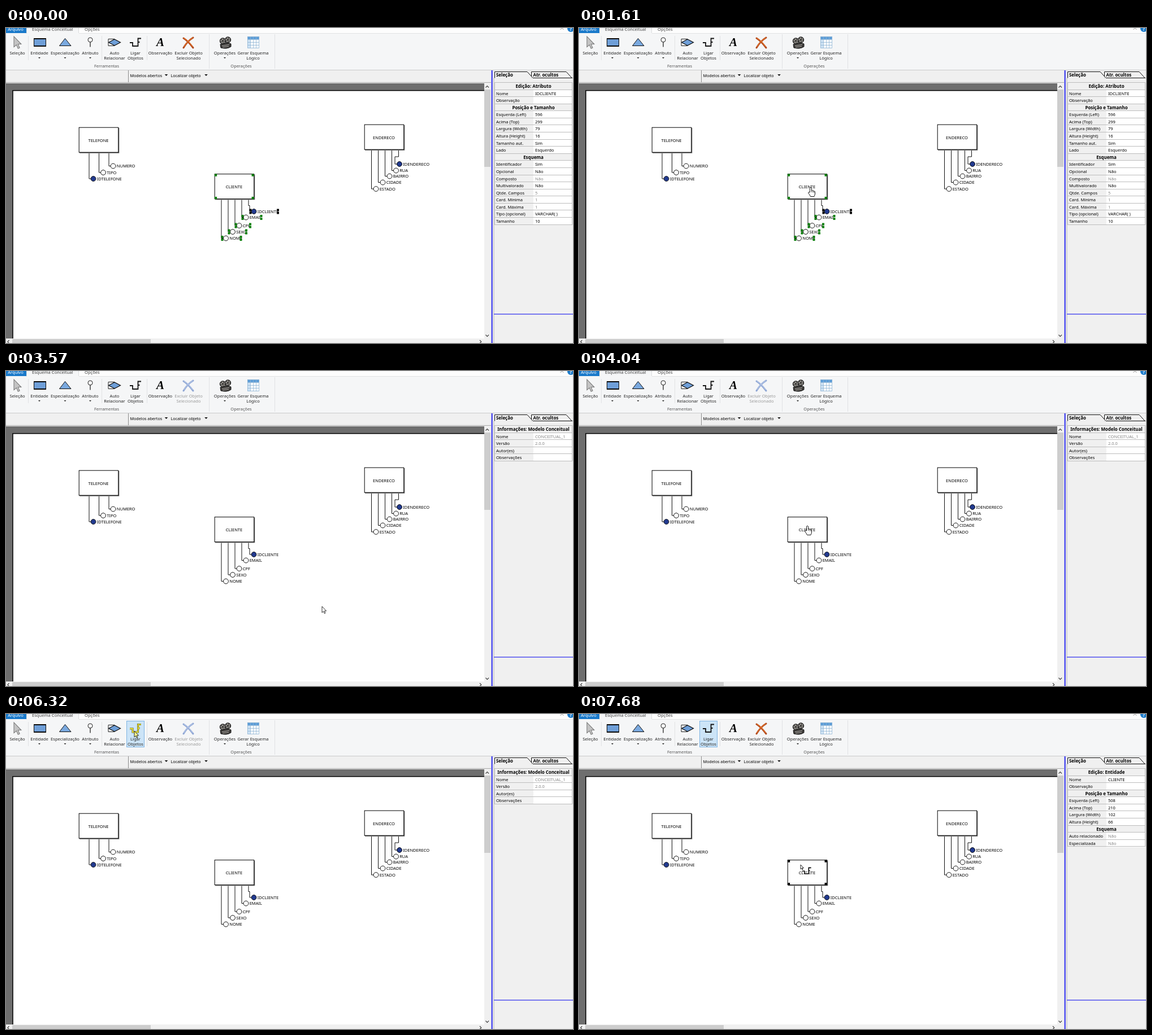
Recreate the animation shown at these times as an HTML page with a canvas. Size 1003x558 px, loop 8000 ms.

```html
<!DOCTYPE html>
<html lang="pt">
<head>
<meta charset="utf-8">
<title>Esquema Conceitual</title>
<style>
html, body { margin: 0; width: 100%; height: 100%; overflow: hidden; background: #f0f0f0; }
canvas { display: block; }
</style>
</head>
<body>
<canvas id="stage" width="1003" height="558"></canvas>
<script>
const LOOP = 8000;
const g = document.getElementById('stage').getContext('2d');
const SANS = '"Noto Sans", "Open Sans", sans-serif';
const FORM = '7.5px ' + SANS, BOLD = 'bold 7.9px ' + SANS, RIBBON = '7.6px ' + SANS;

function rect(x, y, w, h, color) {
  g.fillStyle = color;
  g.fillRect(x, y, w, h);
}
function text(s, x, y, font = FORM, color = '#000', align = 'left') {
  g.font = font;
  g.fillStyle = color;
  g.textAlign = align;
  g.fillText(s, x, y + 2.7);
}
function shape(d, fill, stroke, width = 1) {
  const p = new Path2D(d);
  if (fill) { g.fillStyle = fill; g.fill(p); }
  if (stroke) { g.strokeStyle = stroke; g.lineWidth = width; g.stroke(p); }
}
function disc(x, y, r, fill, stroke, width = 1) {
  g.beginPath();
  g.arc(x, y, r, 0, 7);
  if (fill) { g.fillStyle = fill; g.fill(); }
  if (stroke) { g.strokeStyle = stroke; g.lineWidth = width; g.stroke(); }
}
function at(x, y, scale, draw) {
  g.save();
  g.translate(x, y);
  g.scale(scale, scale);
  draw();
  g.restore();
}
const caret = (x, y, r = 2) => shape(`M${x - r} ${y - r / 2}h${2 * r}l${-r} ${r}Z`, '#111');

// ---- ribbon ----
const ARROW = 'M0 0V11L2.6 8.7L4.3 12.6L6 11.8L4.3 8H7.6Z';
const HAND = 'M-1.5 9V1.2Q0 -.6 1.5 1.2V6Q3 5 4 6.5Q5.6 5.8 6 7.3Q7.6 6.8 7.5 8.5V12' +
  'Q7 14 6 16.5H-.5Q-2 13 -4.2 10.5Q-4.5 8.5 -3 8.8Z';
const LINK = 'M0 8H5V14H14.5V0.5H20M14.5 7H17.5';

const BUTTONS = [
  [20, 'Seleção'], [59, 'Entidade', '', 1], [104.5, 'Especialização', '', 1],
  [149, 'Atributo', '', 1], [192, 'Auto', 'Relacionar'], [229, 'Ligar', 'Objetos'],
  [273, 'Observação'], [323, 'Excluir Objeto', 'Selecionado'],
  [387, 'Operações', '', 1], [437, 'Gerar Esquema', 'Lógico']
];

function reel(x, y, r) {
  disc(x, y, r, '#4a4845', '#1c1c1c');
  for (let i = 0; i < 5; i++) {
    const a = i * Math.PI * 0.4 - 0.5;
    disc(x + Math.cos(a) * r * 0.58, y + Math.sin(a) * r * 0.58, r * 0.2, '#c9c7c3');
  }
}

function icons(s) {
  at(14, 15, 1.7, () => shape(ARROW, '#c4c4c4', '#777', 0.6));

  rect(49, 18, 22, 15, '#0a0a0a');
  rect(50, 20, 20, 11, '#6f9fd8');
  shape('M104.5 18.5L94.5 31.5H115Z', '#7aa9df', '#111');
  disc(149, 21, 4, '#fff', '#222');
  shape('M149 25V33.5', null, '#222', 1.3);
  shape('M181 19.5H192M181 19.5V25.5M181 31.5H192M181 31.5V25.5', null, '#222');
  shape('M181.5 25.5L192 20L202.5 25.5L192 31Z', '#6f9fd8', '#111', 1.2);

  at(219, 18, 1, () => {
    shape(LINK, null, s.click ? '#4d4a18' : '#151515', s.click ? 3 : 1.8);
    if (s.click) shape(LINK, null, '#e8dc2c', 1.8);
  });

  g.font = 'italic bold 21px "Liberation Serif", "Noto Serif", serif';
  g.fillStyle = '#000';
  g.textAlign = 'center';
  g.fillText('A', 273, 32);

  const off = s.none;
  g.lineCap = 'round';
  shape('M314 18Q322 23 331 35M331 17Q321 23 314 35', null, off ? '#8ea6d4' : '#b0481c', 3);
  shape('M315 18Q323 23 330 33M330 17.5Q321 23 315 33', null, off ? '#b4c5e6' : '#e2742c', 1.3);
  g.lineCap = 'butt';

  shape('M379 29Q388 24 398 28V33Q391 38 380 35Z', '#3a3836', '#1c1c1c');
  reel(383.5, 23, 5.2);
  reel(392.5, 21, 5.2);
  shape('M382 31.5L395 29.5M383 34L394 32.5', null, '#b5b2ae', 1.2);

  rect(427, 15, 21, 21, '#fff');
  rect(427, 15, 21, 5, '#5e9ed8');
  rect(427, 20, 5, 16, '#cfe3f5');
  let grid = 'M427.5 15.5H447.5V35.5H427.5Z';
  for (let i = 1; i < 4; i++) grid += `M${427.5 + i * 5} 15.5v20M427.5 ${15.5 + i * 5}h20`;
  shape(grid, null, '#8fb4d4', 0.8);
}

function ribbon(s) {
  rect(0, 0, 1003, 9, '#fdfdfd');
  rect(0, 9, 1003, 65, '#f5f6f7');
  rect(36, 9, 967, 1, '#e2e3e4');
  rect(37, 0, 92, 11, '#f5f6f7');
  rect(36, 0, 1, 9, '#dcdddf');
  rect(128, 0, 1, 9, '#dcdddf');
  rect(0, 0, 36, 9, '#1979ca');
  text('Arquivo', 17, 2, RIBBON, '#fff', 'center');
  text('Esquema Conceitual', 46, 2, RIBBON, '#444');
  text('Opções', 139, 2, RIBBON, '#444');
  shape('M980.5 3L983.5 0L986.5 3', null, '#999', 1);
  disc(999, 1, 6, '#1d7ccb');
  text('?', 999, 2, 'bold 8px ' + SANS, '#fff', 'center');

  for (const x of [39, 169, 249]) rect(x, 14, 1, 43, '#e1e2e4');
  for (const x of [359, 475]) rect(x, 11, 1, 61, '#e1e2e4');
  if (s.hot) {
    rect(213, 12, 32, 47, '#7fb4e3');
    rect(214, 13, 30, 45, '#cce4f7');
  }
  for (const [x, a, b, menu] of BUTTONS) {
    const color = s.none && a.startsWith('Excluir') ? '#9a9a9a' : '#262626';
    text(a, x, 44, RIBBON, color, 'center');
    if (b) text(b, x, 53, RIBBON, color, 'center');
    if (menu) caret(x, 53);
  }
  text('Ferramentas', 178, 67, '7.4px ' + SANS, '#555', 'center');
  text('Operações', 416, 67, '7.4px ' + SANS, '#555', 'center');
  icons(s);
  rect(0, 74, 1003, 1, '#c9cacb');
}

// ---- work area ----
function frame() {
  rect(0, 75, 1003, 483, '#f0f0f0');
  rect(0, 96, 858, 1, '#a8a8a8');
  rect(216, 75, 1, 21, '#8c8c8c');
  text('Modelos abertos', 219.5, 84, '7.2px ' + SANS);
  caret(283.5, 83.5, 2.8);
  text('Localizar objeto', 291.5, 84, '7.2px ' + SANS);
  caret(354, 83.5, 2.8);

  rect(0, 98, 846, 452, '#6e6e6e');
  rect(11.3, 110, 834.7, 440, '#000');
  rect(12.8, 111.5, 833.2, 438.5, '#fff');
  rect(846, 109, 11, 137, '#cdcdcd');
  rect(11, 551, 245, 7, '#cdcdcd');
  shape('M848.5 105.5L851.3 102.7L854 105.5M848.5 543.5L851.3 546.3L854 543.5' +
    'M5.5 553L2.8 555.8L5.5 558.5M838 553L840.8 555.8L838 558.5', null, '#444', 1.2);
  rect(858.6, 75, 2.1, 483, '#3333ee');
}

// x, y, title, then attributes: line x, dot x, dot y, name
const ENTITIES = [
  [129, 176, 'TELEFONE', [[147, 154.5, 267, 'IDTELEFONE', 1], [164.5, 172, 256, 'TIPO'],
    [182, 189.5, 244.5, 'NUMERO']]],
  [634, 171, 'ENDERECO', [[646.5, 654.5, 285, 'ESTADO'], [658.5, 666.5, 273.5, 'CIDADE'],
    [670.5, 678.5, 262.5, 'BAIRRO'], [682.5, 690, 252.5, 'RUA'],
    [694.5, 696, 241, 'IDENDERECO', 1, 688]]],
  [369, 258.5, 'CLIENTE', [[381, 389, 372.5, 'NOME'], [393, 401, 361, 'SEXO'],
    [405, 412.5, 350, 'CPF'], [417, 424.5, 335.5, 'EMAIL'],
    [429, 438.5, 325, 'IDCLIENTE', 1, 431]]]
];
const RIGHT_EDGE = { NOME: 413.5, SEXO: 423, CPF: 430, EMAIL: 449.5, IDCLIENTE: 479 };

function entity([x, y, title, attrs]) {
  rect(x + 1, y + 1, 70.3, 44.8, '#666');
  rect(x - 0.3, y - 0.3, 70.5, 45, '#000');
  rect(x + 0.7, y + 0.7, 68.5, 43, '#fff');
  text(title, x + 34.5, y + 23, FORM, '#000', 'center');
  for (const [lx, cx, cy, name, key, bend] of attrs) {
    const down = bend ? `V${y + (bend < lx ? 57 : 56)}H${bend}` : '';
    shape(`M${lx} ${y + 46}${down}V${cy}H${cx - 4}`, null, '#111');
    disc(cx, cy, 4.4, key ? '#223a90' : '#fff', '#111');
    text(name, cx + 6.2, cy, FORM);
  }
}

function corners(color) {
  for (const x of [369, 434.5])
    for (const y of [258.5, 299]) rect(x, y, 4.2, 4.2, color);
}
function groupHandles() {
  corners('#0a800a');
  for (const [lx, , cy, name, , bend] of ENTITIES[2][3]) {
    const color = bend ? '#000' : '#0a800a';
    for (const x of [(bend || lx) - 0.5, RIGHT_EDGE[name]]) {
      rect(x, cy - 4.5, 4, 4, color);
      rect(x, cy + 0.5, 4, 4, color);
    }
  }
}

// ---- property panel: '#' starts a heading, '~' a greyed value ----
const PANELS = {
  group: ['#Edição: Atributo', 'Nome|IDCLIENTE', 'Observação|', '#Posição e Tamanho',
    'Esquerda (Left)|596', 'Acima (Top)|299', 'Largura (Width)|79', 'Altura (Height)|16',
    'Tamanho aut.|Sim', 'Lado|Esquerdo', '#Esquema', 'Identificador|Sim', 'Opcional|Não',
    'Composto|~Não', 'Multivalorado|Não', 'Qtde. Campos|~5', 'Card. Mínima|~1',
    'Card. Máxima|~1', 'Tipo (opcional)|VARCHAR( )', 'Tamanho|10'],
  none: ['#Informações: Modelo Conceitual', 'Nome|~CONCEITUAL_1', 'Versão|~2.0.0',
    'Autor(es)|', 'Observações|'],
  one: ['#Edição: Entidade', 'Nome|CLIENTE', 'Observação|', '#Posição e Tamanho',
    'Esquerda (Left)|508', 'Acima (Top)|210', 'Largura (Width)|102', 'Altura (Height)|66',
    '#Esquema', 'Auto relacionado|~Não', 'Especializada|~Não']
};

function panel(rows) {
  rect(862.5, 88, 1, 470, '#b5b5b5');
  shape('M929.5 88.5V77.5H991L1001 88.5', '#f0f0f0', '#111');
  shape('M864.5 88.5V77.5H922L932 88.5', '#f0f0f0', '#111');
  shape('M932 88.5H1002', null, '#111');
  text('Seleção', 867, 83, BOLD);
  text('Atr. ocultos', 932.5, 83, BOLD);
  const step = 12.58;
  rows.forEach((row, i) => {
    const y = 97 + i * step, mid = y + 6.3;
    if (row[0] === '#') {
      text(row.slice(1), 933, mid, BOLD, '#000', 'center');
    } else {
      const [name, value] = row.split('|');
      const grey = value[0] === '~';
      rect(933, Math.round(y), 69, 13, '#fff');
      text(name, 867, mid);
      text(grey ? value.slice(1) : value, 936, mid, FORM, grey ? '#858585' : '#000');
    }
    rect(864, Math.round(y) - 1, 138, 1, '#bdbdbd');
  });
  const end = Math.round(97 + rows.length * step);
  rect(864, end - 1, 138, 1, '#bdbdbd');
  rect(864, 96, 1, end - 96, '#bdbdbd');
  rect(1001, 96, 1, end - 96, '#bdbdbd');
  rect(863, 506, 140, 1.6, '#5a5aee');
}

// ---- pointer: start, end, steps, bend x/y, target x/y ----
const MOVES = [
  [440, 1200, 12, 600, 30, 422, 284],
  [1280, 1600, 6, 450, 288, 410, 282],
  [1670, 1960, 5, 414, 266, 410, 284],
  [2090, 2160, 2, 410, 279, 410, 274],
  [3370, 3410, 2, 480, 340, 559, 417],
  [3640, 4040, 7, 480, 340, 404, 274],
  [5040, 5170, 3, 403, 246, 401, 218],
  [5440, 5970, 9, 320, 110, 227, 30],
  [6650, 7410, 12, 290, 170, 391, 272],
  [7480, 7680, 4, 392, 270, 392, 267]
];

function pointer(t) {
  if (t < MOVES[0][0]) return null;
  let x = 950, y = 545;
  for (const [a, b, n, bx, by, ex, ey] of MOVES) {
    if (t < a) break;
    const k = t >= b ? 1 : (Math.floor((t - a) / (b - a) * (n - 1)) + 1) / n;
    const u = k * k * (3 - 2 * k), v = 1 - u;
    x = v * v * x + 2 * u * v * bx + u * u * ex;
    y = v * v * y + 2 * u * v * by + u * u * ey;
  }
  return [x, y];
}

function drawPointer(x, y, s) {
  const over = x > 369 && x < 440 && y > 258 && y < 304;
  at(x, y, 1, () => {
    if (s.linking && y > 97) {
      at(0, 0, 0.7, () => shape(ARROW, '#fff', '#000', 1.2));
      at(3, 5, 0.78, () => {
        shape(LINK, null, '#fff', 4);
        shape(LINK, null, '#000', 2);
      });
    } else if (over) {
      shape(HAND, '#fff', '#000', 0.9);
      shape('M1.5 6V9M4 7V9.5M6 7.6V9.8', null, '#000', 0.7);
    } else {
      shape(ARROW, s.click ? '#f8f48c' : '#fff', '#000', 0.8);
    }
  });
}

function draw(t) {
  const mode = t < 3570 ? 'group' : t < 4630 ? 'none' : t < 5380 ? 'one' : t < 7540 ? 'none' : 'one';
  const s = {
    none: mode === 'none',
    hot: t >= 5900,
    click: t >= 6320 && t < 6450,
    linking: t >= 6450
  };
  frame();
  ribbon(s);
  ENTITIES.forEach(entity);
  if (mode === 'group' && !(t >= 2690 && t < 2820)) groupHandles();
  if (mode === 'one') corners('#000');
  panel(PANELS[mode]);
  const p = pointer(t);
  if (p) drawPointer(p[0], p[1], s);
}

const begin = performance.now();
function tick() {
  draw((performance.now() - begin) % LOOP);
  requestAnimationFrame(tick);
}
tick();
</script>
</body>
</html>
```
